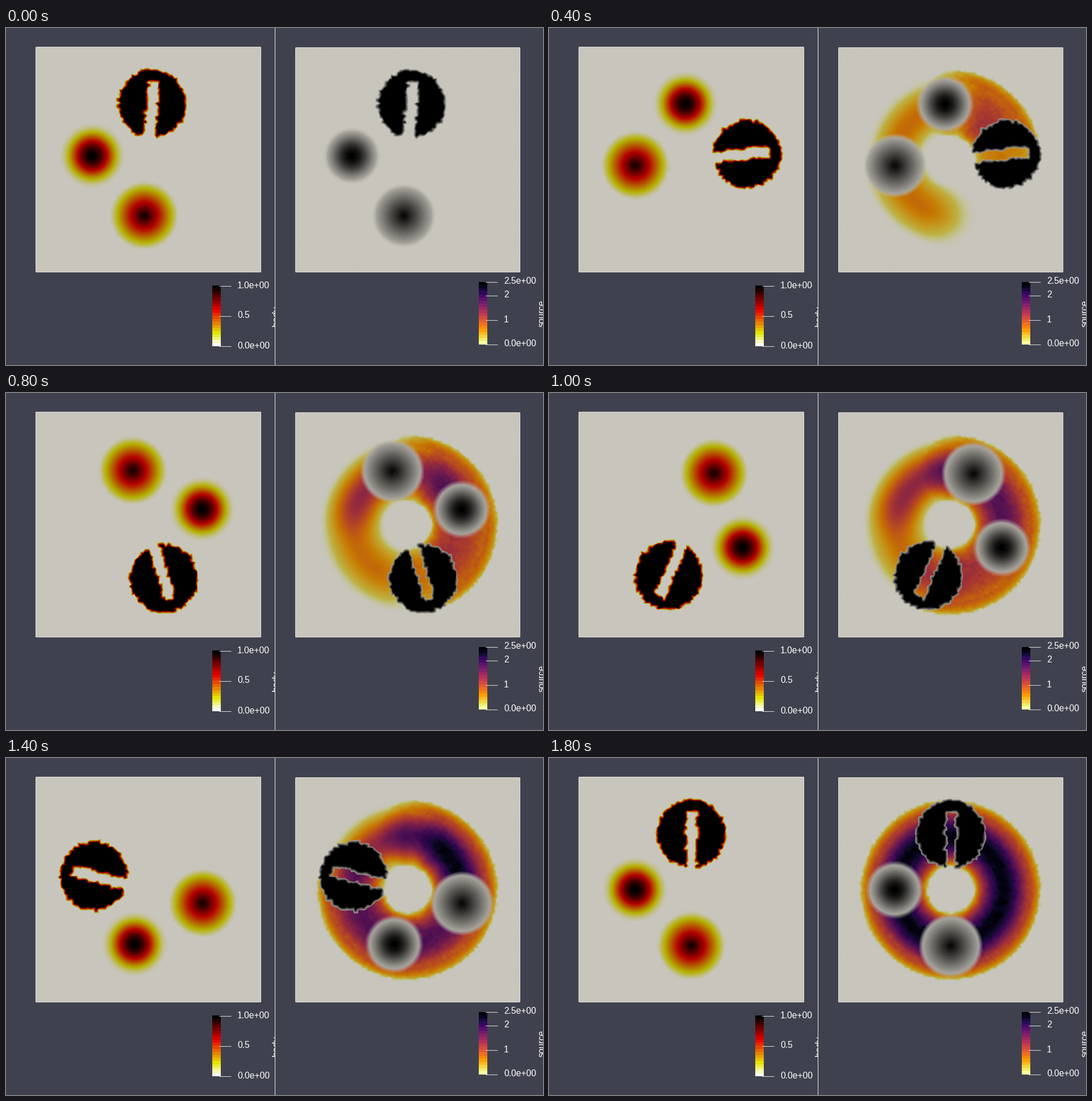
Recreate the animation shown at these times as a matplotlib script. Size 945 px wide and 593 px high, loop 1.9 s.

```python
import numpy as np
import matplotlib.pyplot as plt
from matplotlib.animation import FuncAnimation
from matplotlib.colors import LinearSegmentedColormap
from matplotlib.patches import FancyBboxPatch, Rectangle
from matplotlib.tri import Triangulation

W, H, DPI = 945, 593, 64
PX = 72 / DPI                      # one pixel in points
BG = (63 / 255, 66 / 255, 78 / 255)
LIT = np.array([200, 197, 188]) / 255   # white under the scene light
FRAMES, INTERVAL = 19, 100
STEPS, PER_FRAME = 90, 5           # solver steps per turn and per frame
RATE = 0.075                       # source gained per step
SOURCE_MAX = 2.5
CELLS, SIDE = 76, 395

heat = LinearSegmentedColormap.from_list(
    "heat", [(0, "white"), (0.2, (0.9, 0.9, 0)), (0.6, (0.9, 0, 0)), (1, "black")])
inferno = plt.get_cmap("inferno_r")


# --- mesh and fields -------------------------------------------------------

def make_mesh():
    """Jittered triangle mesh of the unit square, centred on the origin."""
    rng = np.random.default_rng(4)
    x, y = np.meshgrid(np.linspace(0, 1, CELLS + 1), np.linspace(0, 1, CELLS + 1))
    inside = (x > 0) & (x < 1) & (y > 0) & (y < 1)
    x = x + inside * rng.uniform(-0.3, 0.3, x.shape) / CELLS
    y = y + inside * rng.uniform(-0.3, 0.3, y.shape) / CELLS
    return Triangulation(x.ravel() - 0.5, y.ravel() - 0.5)


def pixel_weights(mesh):
    """Corner indices and barycentric weights for every pixel."""
    c = (np.arange(SIDE) + 0.5) / SIDE - 0.5
    px, py = np.meshgrid(c, -c)
    corners = mesh.triangles[mesh.get_trifinder()(px, py)]
    ax, bx, cx = np.moveaxis(mesh.x[corners], -1, 0)
    ay, by, cy = np.moveaxis(mesh.y[corners], -1, 0)
    area = (by - cy) * (ax - cx) + (cx - bx) * (ay - cy)
    wa = ((by - cy) * (px - cx) + (cx - bx) * (py - cy)) / area
    wb = ((cy - ay) * (px - cx) + (ax - cx) * (py - cy)) / area
    return corners, np.stack([wa, wb, 1 - wa - wb], axis=-1)


def bodies(x, y, turn):
    """Slotted disc, cone and smooth hump, turned clockwise."""
    u = x * np.cos(turn) - y * np.sin(turn)
    v = x * np.sin(turn) + y * np.cos(turn)

    def reach(cx, cy):
        return np.minimum(np.hypot(u - cx, v - cy) / 0.15, 1)

    slot = (np.abs(u) < 0.025) & (v < 0.35)
    disc = (reach(0, 0.25) < 1) & ~slot
    cone = 1 - reach(0, -0.25)
    hump = (1 + np.cos(np.pi * reach(-0.25, 0))) / 2
    return disc + cone + hump


mesh = make_mesh()
corners, weights = pixel_weights(mesh)
turns = 2 * np.pi * np.arange(STEPS + 1) / STEPS
body_steps = np.array([bodies(mesh.x, mesh.y, t) for t in turns])
source_steps = RATE * np.cumsum(body_steps[1:], axis=0)


def to_pixels(values):
    return np.clip((values[corners] * weights).sum(axis=-1), 0, None)


def body_image(body):
    return heat(np.clip(body, 0, 1))[..., :3] * LIT


def source_image(source, body):
    glow = inferno(np.clip(source / SOURCE_MAX, 0, 1))[..., :3]
    alpha = np.clip((source - 0.01) / 0.16, 0, 1)[..., None]
    base = (1 - alpha + alpha * glow) * LIT
    shade = np.clip(np.round(body * 16) / 16, 0, 1)[..., None]
    cover = np.clip((body - 0.04) / 0.13, 0, 1)[..., None]
    return base * (1 - cover) + (1 - shade) * LIT * cover


def images(frame):
    step = min(1 + PER_FRAME * frame, STEPS)
    body = to_pixels(body_steps[step])
    source = to_pixels(source_steps[step - 1])
    return body_image(body), source_image(source, body)


# --- stage -----------------------------------------------------------------

fig = plt.figure(figsize=(W / DPI, H / DPI), dpi=DPI, facecolor=BG)
ax = fig.add_axes([0, 0, 1, 1])


def label(x, y, text, size=15.6, **kw):
    ax.text(x, y, text, color="white", family="Liberation Sans",
            fontsize=size * PX, va="baseline", zorder=kw.pop("zorder", 5), **kw)


def panel(x, y, w, h):
    ax.add_patch(FancyBboxPatch((x, y), w, h, boxstyle="round,pad=0,rounding_size=1.5",
                                fc=(0.89, 0.88, 0.86), ec="none", zorder=3))
    return ax.imshow(np.ones((SIDE, SIDE, 3)) * LIT, zorder=4, interpolation="bilinear",
                     extent=(x + 1, x + w - 1, y + h - 1, y + 1))


def color_bar(x, top, bottom, cmap, ticks):
    bands = cmap(np.linspace(1, 0, 20))[:, None, :3]
    ax.imshow(bands, extent=(x, x + 15, bottom, top), interpolation="nearest", zorder=4)
    for y, text in ticks:
        ax.plot([x + 12, x + 33], [y + 0.5, y + 0.5], color=(0.85, 0.86, 0.87),
                lw=PX, solid_capstyle="butt", zorder=5)
        label(x + 44, y + 4.5, text)


label(480, 525, "body", 17, rotation=90, ha="right", zorder=1) if False else None
ax.text(480, 525, "body", color="white", family="Liberation Sans", fontsize=17 * PX,
        rotation=90, rotation_mode="anchor", ha="left", va="baseline", zorder=1)
ax.add_patch(Rectangle((473, 0), W - 473, H, fc=BG, ec="none", zorder=2))
ax.add_patch(Rectangle((473, 0), 1, H, fc=(0.92, 0.92, 0.93), ec="none", zorder=3))
label(948, 526, "source", 15.8, rotation=90, rotation_mode="anchor", ha="left")

left = panel(52, 33, 397, 397)
right = panel(509, 34, 396, 396)
color_bar(363, 453, 560, heat, [(453, "1.0e+00"), (506, "0.5"), (559, "0.0e+00")])
color_bar(832, 447, 557, inferno,
          [(446, "2.5e+00"), (470, "2"), (513, "1"), (556, "0.0e+00")])

ax.set(xlim=(0, W), ylim=(H, 0), aspect="auto")
ax.axis("off")


def update(frame):
    for artist, data in zip((left, right), images(frame)):
        artist.set_data(np.clip(data, 0, 1))
    return left, right


anim = FuncAnimation(fig, update, frames=FRAMES, interval=INTERVAL,
                     repeat=True, repeat_delay=0, blit=False)
plt.show()
```
